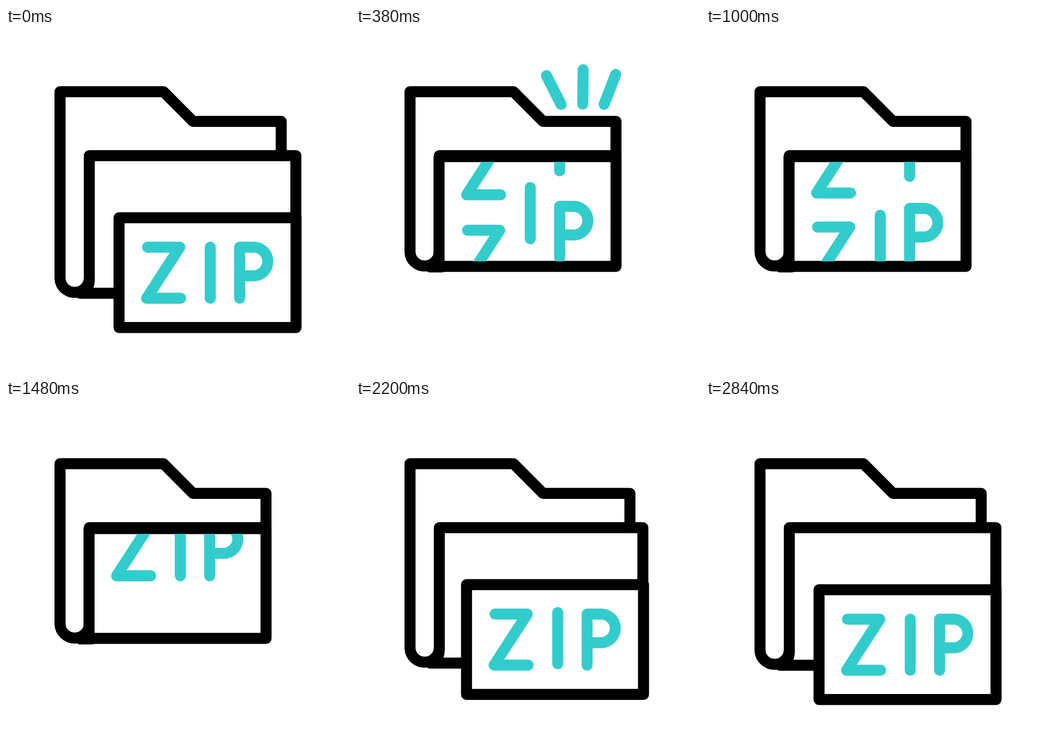
Write an HTML page that moves like this. It is 640x640 px and loops after 3600 ms.

```html
<!DOCTYPE html>
<html lang="en">
<head>
<meta charset="utf-8">
<title>Zip folder</title>
<style>
html, body { margin: 0; width: 100%; height: 100%; overflow: hidden; background: #fff; }
svg { display: block; width: 100%; height: 100%; }
path { fill: none; stroke: #000; stroke-width: 20.5; stroke-linecap: round; stroke-linejoin: round; }
#label { fill: #fff; }
#letters path, #sparks path { stroke: #3cc; }
</style>
</head>
<body>
<svg viewBox="0 0 640 640">
  <defs><clipPath id="inside"><rect x="220" y="363" width="310" height="185"/></clipPath></defs>
  <path id="back"/>
  <path id="front"/>
  <g id="card">
    <path id="label" d="M210.3 353H539.6V557.2H210.3Z"/>
    <g id="letters" clip-path="url(#inside)"></g>
  </g>
  <g id="sparks"></g>
</svg>
<script>
const LOOP = 3600, STEP = 20;
const $ = id => document.getElementById(id);

// delay: lag behind the first letter; leave: start of the second exit; settle: length of the last drop
const LETTERS = [
  { d: 'M263.3 407.7H323.3L261.6 502.8H324.8', delay: 0, leave: 807, settle: 500 },
  { d: 'M380 407.7V502.8', delay: 171, leave: 844, settle: 820 },
  { d: 'M434.6 502.8V407.7H462A26.7 26.7 0 0 1 462 461H434.6', delay: 77, leave: 867, settle: 552 }
];
const ROLL = 400, GAP = 161, ABOVE = 180, PAUSE = 62;

// Bottoms and tops of the three rays
const SPARKS = [[381.5, 142, 354.3, 88.6], [421.8, 141.5, 422.6, 77.6], [461.6, 142, 483.2, 86.3]];
const BURSTS = [260, 1650];

const clamp = x => Math.min(1, Math.max(0, x));
const mix = (a, b, k) => a + (b - a) * k;
const smooth = x => (x = clamp(x), x * x * (3 - 2 * x));

// Ease with horizontal ends; a and b are the handles' times
function ease(x, a, b) {
  if (x <= 0 || x >= 1) return clamp(x);
  let lo = 0, hi = 1;
  for (let i = 0; i < 30; i++) {
    const u = (lo + hi) / 2, v = 1 - u;
    if (3 * a * u * v * v + 3 * b * u * u * v + u ** 3 < x) lo = u; else hi = u;
  }
  return smooth(lo);
}

function addPath(parent, d = '') {
  const p = document.createElementNS('http://www.w3.org/2000/svg', 'path');
  p.setAttribute('d', d);
  return parent.appendChild(p);
}

const reels = LETTERS.map(l => ({ ...l, copies: [0, 1, 2].map(() => addPath($('letters'), l.d)) }));
const rays = SPARKS.map(() => addPath($('sparks')));

const openness = t => t < 1000
  ? 1 - ease((t - 25) / 310, 0.333, 0.4)
  : ease((t - 1470) / 1270, 0.25, 0);

function drawFolder(p) {
  const low = mix(417.5, 466.5, p), base = low + 27;
  const backX = mix(483.7, 512, p), frontX = mix(483.7, 539.3, p ** 1.22);
  $('back').setAttribute('d',
    `M155 ${low}A27.3 27 0 0 1 100.5 ${low}V118.5H293L348 173.7H${backX}V237.5`);
  $('front').setAttribute('d',
    `M138 ${base}Q155 ${base - 5} 155 ${low}V237.5H${frontX}V${mix(239.5, 353, p)}` +
    `M138 ${base}H${mix(160, 212, p)}`);
  $('card').setAttribute('transform', `translate(${-55.8 * (1 - p)} ${-113.8 * (1 - p)})`);
}

// The first copy rolls out, the second rolls through, the third pauses high and then drops home
function drawReel({ delay, leave, settle, copies }, t) {
  const roll = from => smooth((t - from) / ROLL);
  const first = GAP * roll(177 + delay);
  const offsets = [
    first,
    first - GAP + GAP * roll(leave),
    mix(-ABOVE, -PAUSE, roll(705 + delay)) + PAUSE * smooth((t - 1480) / settle)
  ];
  copies.forEach((el, i) => el.setAttribute('transform', `translate(0 ${offsets[i]})`));
}

function drawSparks(t) {
  const age = t - BURSTS[t < 1200 ? 0 : 1];
  const head = clamp(age / 120), tail = clamp((age - 130) / 178);
  SPARKS.forEach(([x, y, X, Y], i) => {
    rays[i].style.display = head > 0 && tail < 1 ? '' : 'none';
    rays[i].setAttribute('d',
      `M${mix(x, X, tail)} ${mix(y, Y, tail)}L${mix(x, X, head)} ${mix(y, Y, head)}`);
  });
}

function draw(t) {
  drawFolder(openness(t));
  reels.forEach(reel => drawReel(reel, t));
  drawSparks(t);
}

const start = performance.now();
function frame() {
  const t = (performance.now() - start) % LOOP;
  draw(Math.floor(t / STEP) * STEP);
  requestAnimationFrame(frame);
}
frame();
</script>
</body>
</html>
```
